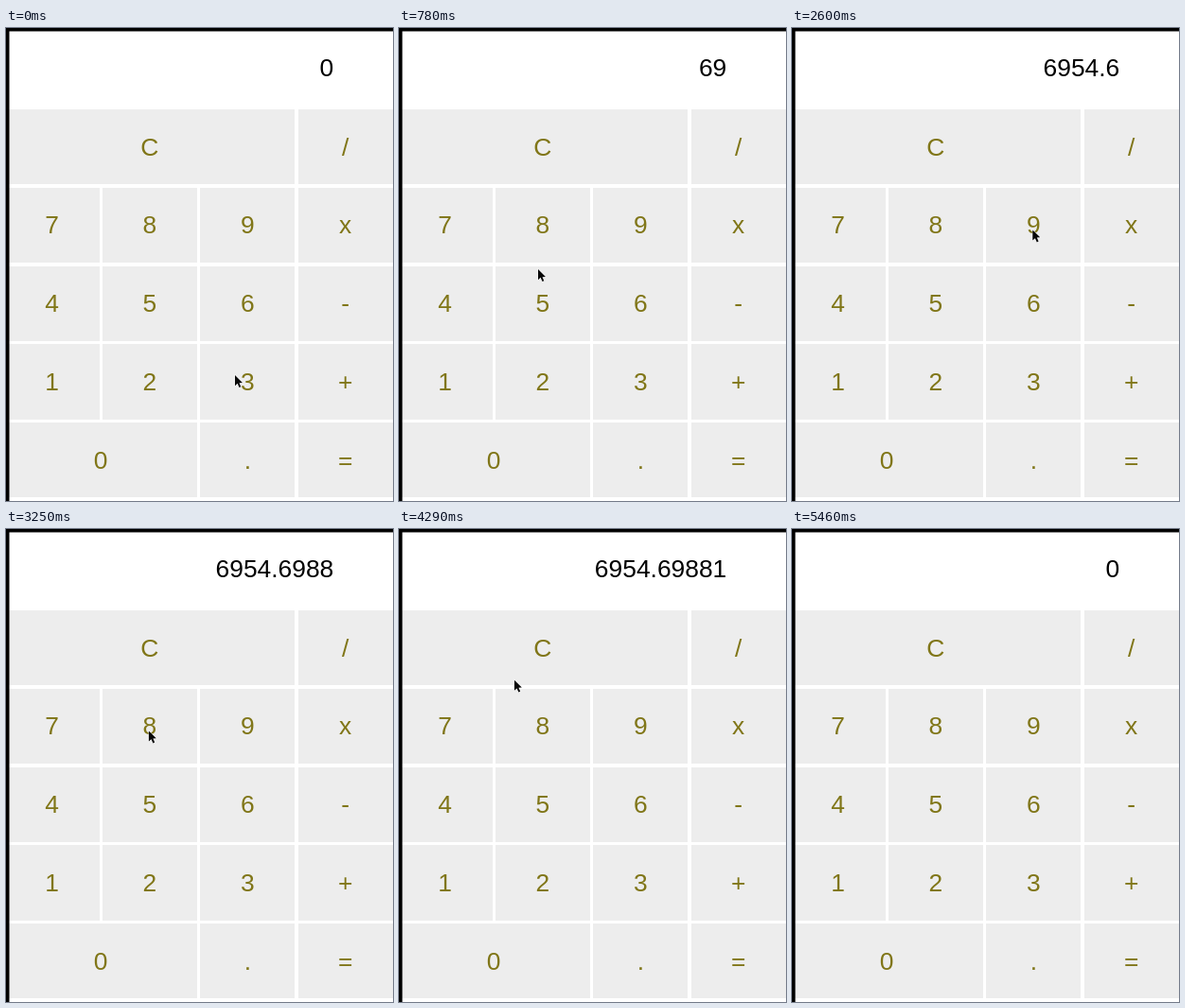
Write an HTML page with a canvas that moves like this. It is 409 px wide and 500 px high and loops after 6110 ms.

```html
<!DOCTYPE html>
<html lang="en">
<head>
<meta charset="utf-8">
<title>Calculator</title>
<style>
  html, body { margin: 0; width: 100%; height: 100%; overflow: hidden; background: #fff; }
  canvas { display: block; }
</style>
</head>
<body>
<canvas id="stage" width="409" height="500"></canvas>
<script>
const ctx = document.getElementById('stage').getContext('2d');
const STEP = 130, LOOP = 6110;
const COL = 103.4, ROW = 82.75, GAP = 3.4, LEFT = -1.5, TOP = 86, BORDER = 3.5;

// A repeated label spans several columns.
const keys = {};
['CCC/', '789x', '456-', '123+', '00.='].forEach((row, r) => {
  for (const label of new Set(row)) {
    const span = row.split(label).length - 1;
    keys[label] = {
      span,
      x: LEFT + row.indexOf(label) * COL,
      y: TOP + r * ROW,
      width: span * COL - GAP,
      height: ROW - GAP
    };
  }
});

// The pointer's tour: keys it presses and points it passes.
const TOUR = [
  [0, [242, 367]], [2, '6'], [5, '9'], [6, [147, 255]], [8, '5'], [10, '4'],
  [13, [271, 459]], [14, '.'], [16, '6'], [21, '9'], [23, '8'], [25, '8'],
  [29, '1'], [30, [41, 316]], [38, 'C'], [42, [425, 225]]
].map(([step, stop]) => ({ step, key: keys[stop] && stop, at: keys[stop] ? aim(keys[stop]) : stop }));

// Wide keys are hit further left of their centre.
function aim({ x, y, width, height, span }) {
  return [x + width / 2 - 7 * span + 6, y + height / 2 + 5];
}

const smooth = u => u * u * (3 - 2 * u);

function pointerAt(step) {
  const i = TOUR.findIndex(stop => stop.step > step);
  if (i < 0) return null;
  const from = TOUR[i - 1], to = TOUR[i];
  const progress = (step - from.step) / (to.step - from.step);
  // Before a press the pointer rests on the key for half the time.
  const u = smooth(Math.min(1, progress * (to.key ? 2 : 1)));
  return from.at.map((start, axis) => start + (to.at[axis] - start) * u);
}

function displayAt(step) {
  const typed = TOUR.filter(stop => stop.key && stop.step <= step).map(stop => stop.key).join('');
  return typed.split('C').pop() || '0';
}

function text(label, x, y, align, color) {
  ctx.textAlign = align;
  ctx.fillStyle = color;
  ctx.fillText(label, x, y);
}

function drawKey(label, { x, y, width, height }) {
  const left = Math.round(x), top = Math.round(y);
  ctx.fillStyle = '#ededed';
  ctx.fillRect(left, top, Math.round(x + width) - left, Math.round(y + height) - top);
  text(label, x + width / 2, Math.floor(y + 49), 'center', '#807618');
}

function drawPointer([x, y]) {
  ctx.save();
  ctx.translate(x, y);
  ctx.scale(0.9, 0.9);
  ctx.lineWidth = 1.2;
  ctx.strokeStyle = 'rgba(255, 255, 255, .6)';
  ctx.fillStyle = '#080808';
  const arrow = new Path2D('M0 0V12.4L2.9 9.8L5 14.4L7 13.5L5 9.1L8.8 8.8Z');
  ctx.stroke(arrow);
  ctx.fill(arrow);
  ctx.restore();
}

function draw(now) {
  const step = Math.floor((now % LOOP) / STEP);
  ctx.fillStyle = '#fff';
  ctx.fillRect(0, 0, 409, 500);
  ctx.font = '26.4px "Liberation Sans", Arial, sans-serif';
  for (const label in keys) drawKey(label, keys[label]);
  text(displayAt(step), 346.3, 51, 'right', '#000');
  ctx.fillStyle = '#000';
  ctx.fillRect(0, 0, 409, BORDER);
  ctx.fillRect(0, 0, BORDER, 500);
  const pointer = pointerAt(step);
  if (pointer) drawPointer(pointer);
}

const start = performance.now();
function tick() {
  draw(performance.now() - start);
  requestAnimationFrame(tick);
}
tick();
</script>
</body>
</html>
```
